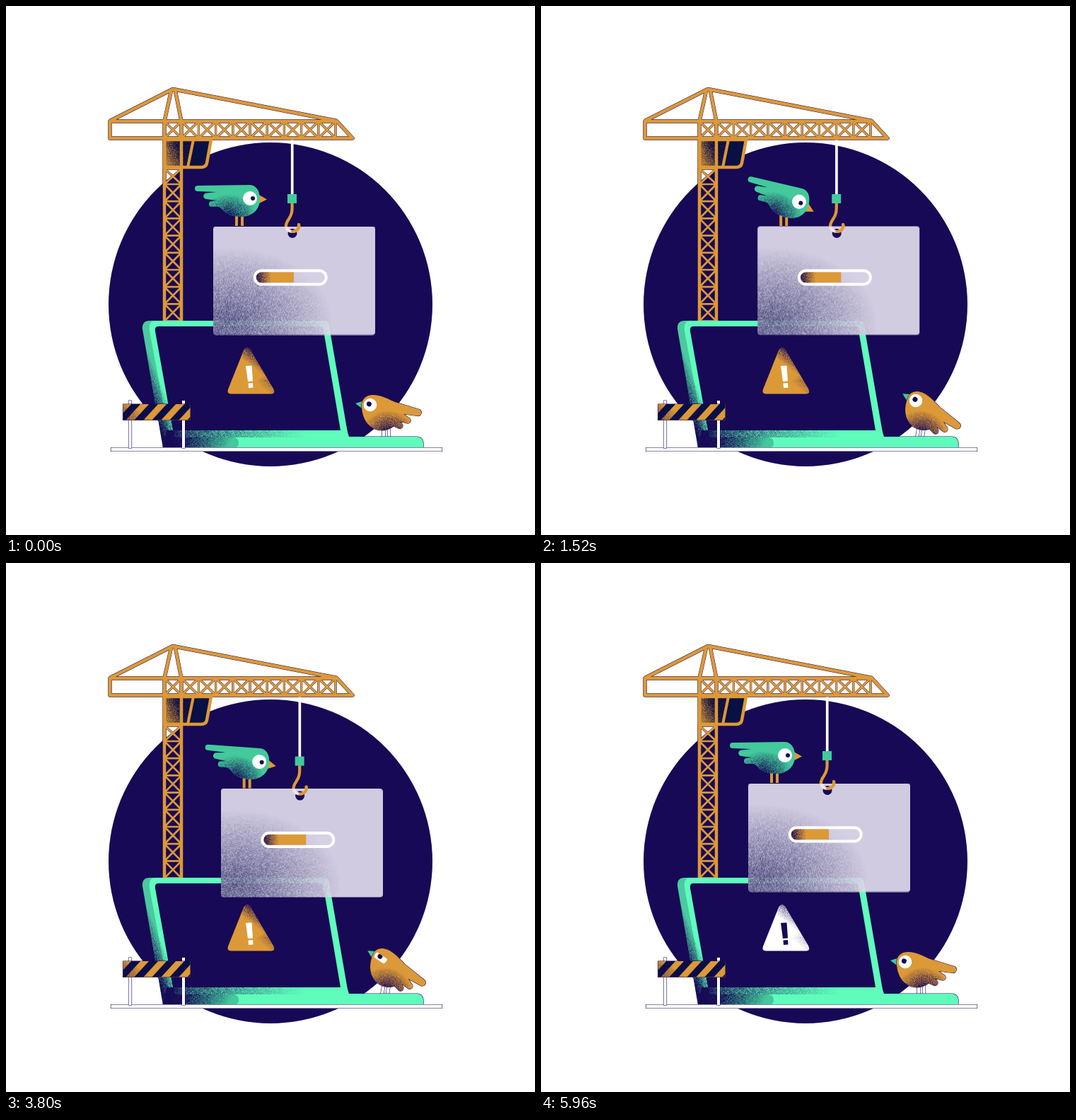
These frames come from a looping animation (748x748 px, 6 s). An HTML page with a canvas:

```html
<!DOCTYPE html>
<html lang="en">
<head>
<meta charset="utf-8">
<title>Crane at work</title>
<style>
html, body { margin: 0; width: 100%; height: 100%; overflow: hidden; background: #fff; }
canvas { display: block; width: 100vw; height: 100vh; }
</style>
</head>
<body>
<canvas id="stage" width="748" height="748"></canvas>
<script>
const SIZE = 748, LOOP = 6000;
const NAVY = '#170955', ORANGE = '#dc9937', MINT = '#5ffcbc', TEAL = '#43c99b', WHITE = '#fff';
const view = document.getElementById('stage').getContext('2d');
let g = view;

let seed = 7;
const rand = () => (seed = (seed * 16807) % 2147483647) / 2147483647;
const clamp = v => Math.max(0, Math.min(1, v));
const ease = (t, a, b) => (1 - Math.cos(Math.PI * clamp((t - a) / (b - a)))) / 2;
const bump = (t, mid, wide) => Math.exp(-(((t - mid) / wide) ** 2));

function layer(w, h, draw) {
  const c = document.createElement('canvas');
  c.width = w;
  c.height = h;
  const old = g;
  g = c.getContext('2d');
  draw();
  g = old;
  return c;
}

// Soft shading with a light speckle; density takes stage coordinates.
function grain(x, y, w, h, density, color = NAVY) {
  const img = layer(w, h, () => {
    g.fillStyle = color;
    for (let j = 0; j < h; j++)
      for (let i = 0; i < w; i++) {
        const d = clamp(density(x + i, y + j));
        g.globalAlpha = clamp(d + (rand() - 0.5) * 1.6 * d * (1.15 - d));
        g.fillRect(i, j, 1, 1);
      }
  });
  return { img, x, y };
}

function shade(path, s) {
  g.save();
  g.clip(path);
  g.drawImage(s.img, s.x, s.y);
  g.restore();
}

function fill(d, color) {
  const p = typeof d === 'string' ? new Path2D(d) : d;
  g.fillStyle = color;
  g.fill(p);
  return p;
}

function stroke(d, color, width, cap = 'butt') {
  g.strokeStyle = color;
  g.lineWidth = width;
  g.lineCap = cap;
  g.lineJoin = 'round';
  g.stroke(typeof d === 'string' ? new Path2D(d) : d);
}

// A shape with a fine dark rim, visible only against white.
function rimmed(d, color) {
  const p = new Path2D(d);
  stroke(p, NAVY, 1.2);
  return fill(p, color);
}

function disc(x, y, r, color) {
  g.fillStyle = color;
  g.beginPath();
  g.arc(x, y, r, 0, 7);
  g.fill();
}

function crane() {
  let thin = '';
  const cross = (x, y, w, h) => `M${x} ${y}l${w} ${h}M${x + w} ${y}l${-w} ${h}`;
  for (let k = 0; k < 10; k++) {
    const x = 224 + k * 24.2;
    thin += cross(x, 163, 24.2, 24) + `M${x + 24.2} 163v24`;
  }
  thin += cross(224, 230, 24, 22) + 'M224 252h24';
  for (let k = 0; k < 8; k++) {
    const y = 252 + k * 24.2;
    thin += cross(224, y, 24, 24.2) + `M224 ${y + 24.2}h24`;
  }
  const thick = 'M147 163H468L490 187H147ZM147 162.5L236 117.5L468 162.5M234 118L224 163V446' +
    'M239 118L248 163V446M224 229H248';
  stroke(thin, NAVY, 3.3);
  stroke(thick, NAVY, 5.4);

  const cab = new Path2D('M224 189H290L284 222Q283 228 276 228H224Z');
  fill(cab, '#091044');
  const room = new Path2D('M226 190H264L257 227H226Z');
  fill(room, ORANGE);
  shade(room, grain(224, 188, 44, 42, (x, y) => 0.3 + (x - 226) / 34 + (208 - y) / 90, '#0b0c45'));
  stroke(cab, ORANGE, 4.5);
  stroke('M265 189L257 228', ORANGE, 4);
  stroke(thin, ORANGE, 2.7);
  stroke(thick, ORANGE, 4.5);
}

function laptop() {
  const base = rimmed('M227 600H482L485 609H580Q590 609 590 619V625H222Z', MINT);
  fill('M193 457Q192 445 203 445H214L240 625H222Z', '#4bc9a0');
  fill('M211 445H450Q455.5 445 456.5 450L484 609H231L203 460Q201 445 211 445Z', MINT);
  const edge = new Path2D('M193 455H212L240 625H222Z');
  shade(edge, grain(190, 450, 52, 176,
    (x, y) => (y - 485) / 118 - (x - 193 - (y - 450) * 0.17) / 28));
  fill('M215 453H444Q448 453 448.7 457L473 600H236L211 460Q210 453 215 453Z', NAVY);
  fill('M240 610H322Q329 611 329 618Q329 625 322 625H240Z', TEAL);
  shade(base, grain(222, 600, 210, 10, x => 1.05 - Math.sqrt(Math.max(0, x - 236) / 170)));
  shade(base, grain(222, 610, 110, 16, (x, y) => 1.15 - (x - 238 + (y - 610) * 0.5) / 72));
}

function barrier() {
  rimmed('M173.5 558h4v67h-4ZM249 558h4v67h-4Z', WHITE);
  const board = rimmed('M165.5 563H260.5V585.5H165.5Z', ORANGE);
  g.save();
  g.clip(board);
  for (let k = 0; k < 5; k++) fill(`M${178 + k * 25} 562h13l-23 25h-13Z`, '#0b0d48');
  g.restore();
  shade(board, grain(165, 562, 96, 25, (x, y) => 0.35 - (x - 165) / 80 + (y - 575) / 60));
}

const backdrop = layer(SIZE, SIZE, () => {
  g.fillStyle = WHITE;
  g.fillRect(0, 0, SIZE, SIZE);
  disc(374, 422, 229, NAVY);
  crane();
  laptop();
  rimmed('M148.5 624.5H616.5V629.5H148.5Z', WHITE);
  barrier();
});

const CARD = { x: 293, y: 311.5, w: 229, h: 153.5 };
const cardImage = layer(229, 154, () => {
  g.fillStyle = 'rgba(223,219,235,.93)';
  g.beginPath();
  g.roundRect(0, 0, CARD.w, CARD.h, 4);
  g.fill();
  g.globalCompositeOperation = 'source-atop';
  const dust = grain(0, 0, 229, 154,
    (x, y) => 0.56 * (1 - Math.hypot((x - 18) / 150, (y - 135) / 105)), '#1c1c5a');
  g.drawImage(dust.img, 0, 0);
});

const sign = new Path2D('M336 487Q341 479.5 346 487L378.5 542Q381 548.5 375 548.5H318Q312 548 314 542Z');
const signDust = grain(312, 480, 70, 70,
  (x, y) => Math.max(0.7 - (y - 482) / 32 + (x - 341) / 40, (x - 353) / 60 - Math.abs(y - 530) / 55));

function warning(white) {
  fill(sign, white ? WHITE : ORANGE);
  g.globalAlpha = white ? 0.7 : 1;
  shade(sign, signDust);
  g.globalAlpha = 1;
  fill('M339 509L347.5 508.5L349 530.5L342 531ZM342.5 533.5L349 533L349.5 539.5L343 540Z',
    white ? NAVY : WHITE);
}

const HOOK = 'M404.5 278C405 291 404 295 400 301C393 311 395 319 405 319C411 319 415 315 414 309';
const barDust = grain(352, 374, 32, 20, x => 0.85 - (x - 354) / 24);

function progress(len) {
  const inner = new Path2D();
  inner.roundRect(353, 375, 98, 17, 8.5);
  fill(inner, 'rgba(218,213,232,.55)');
  g.save();
  g.clip(inner);
  g.fillStyle = ORANGE;
  g.fillRect(352, 376, len - 2, 15);
  g.drawImage(barDust.img, barDust.x, barDust.y);
  g.restore();
  const ring = new Path2D();
  ring.roundRect(351.7, 374.2, 101, 19.2, 9.6);
  stroke(ring, WHITE, 4);
}

const green = new Path2D('M344 253L271 254A4 4 0 0 0 271 262L297 263L284 264.5A4 4 0 0 0 283 273L298 275' +
  'L291 276A4 4 0 0 0 291 284C297 284 301 283 304 286C311 295 322 298 332 298' +
  'C348 298 359 288 359 273C359 260 353 253 344 253Z');
const greenDust = grain(264, 250, 98, 50,
  (x, y) => 0.95 - Math.hypot((x - 314) / 42, (y - 297) / 33));

function rotate(deg, x, y) {
  g.translate(x, y);
  g.rotate(deg * Math.PI / 180);
  g.translate(-x, -y);
}

function greenBird(turn) {
  const look = clamp(turn / 22);
  stroke('M326 296V311M334 296V311', ORANGE, 4);
  g.save();
  rotate(turn, 329, 302);
  g.save();
  rotate(20 * look, 337, 275);
  fill('M356 266L369 273.5L356 280Z', ORANGE);
  g.restore();
  fill(green, TEAL);
  shade(green, greenDust);
  disc(345, 272, 10, WHITE);
  disc(349 - 2 * look, 272 + 2 * look, 3, NAVY);
  g.restore();
}

const tan = 'M503 567C502 556 509 550 519 550C530 550 541 556 550 560L583 570A4.6 4.6 0 0 1 582 579.5L562 577' +
  'L569 582A4 4 0 0 1 567 590L556 587L559 590A4 4 0 0 1 555 597L548 594C543 598 538 600 531 600' +
  'C517 600 504 588 503 567Z';
const tanDust = grain(500, 548, 90, 54,
  (x, y) => 0.95 - Math.hypot((x - 540) / 38, (y - 602) / 32));

function tanBird(turn, squint) {
  const lean = -turn / 11;
  rimmed(`M532 596h4l${lean} 12.5h-4ZM539.5 596h4l${lean} 12.5h-4Z`, WHITE);
  g.save();
  rotate(turn, 538, 599.5);
  fill('M494 562L505 558.5L506 571Z', TEAL);
  const body = rimmed(tan, ORANGE);
  shade(body, tanDust);
  g.translate(515, 564);
  g.rotate(0.21);
  g.beginPath();
  g.rect(-10, -10 + 6.5 * squint, 20, 20 - 11.5 * squint);
  g.clip();
  disc(0, 0, 9.3, WHITE);
  disc(-1.8, -0.8, 3.5, NAVY);
  g.restore();
}

function hanging(t) {
  const dx = 13.2 * (ease(t, 100, 1500) - ease(t, 3380, 4830));
  const dy = 7.6 * (ease(t, 2480, 3080) - ease(t, 4850, 5450));
  const tilt = -0.3 * bump(t, 2000, 220) - 0.42 * bump(t, 5060, 200);
  const nod = -6.5 * ease(t, 600, 1000) + 28.7 * ease(t, 1200, 1700) - 22.2 * ease(t, 3300, 4030);

  g.save();
  g.translate(dx, 0);
  stroke(`M404.7 189.5V${267 + dy}`, WHITE, 3.7);
  g.translate(0, dy);
  stroke(HOOK, ORANGE, 4.2, 'round');
  g.fillStyle = TEAL;
  g.fillRect(398, 266, 13, 13);

  rotate(tilt, 405, 318);
  g.drawImage(cardImage, CARD.x, CARD.y);
  disc(405, 321.5, 6.5, NAVY);
  stroke('M397 313C398 317 401 319 405 319', '#efe6ea', 4);
  stroke('M405 319C411 319 415 315 414 309', ORANGE, 4.2, 'round');
  progress(57 + 8 * Math.sin(Math.PI * t / LOOP) ** 2);
  // The settled nod leaves the bird level again.
  greenBird(nod);
  g.restore();
}

function render(t) {
  g.drawImage(backdrop, 0, 0);
  warning(t % 1200 >= 600);
  hanging(t);
  const turn = 22 * (ease(t, 500, 900) - ease(t, 4300, 4700));
  const squint = ease(t, 3060, 3180) - ease(t, 5400, 5520);
  tanBird(turn, squint);
}

const start = performance.now();
function tick() {
  render((performance.now() - start) % LOOP);
  requestAnimationFrame(tick);
}
tick();
</script>
</body>
</html>
```
